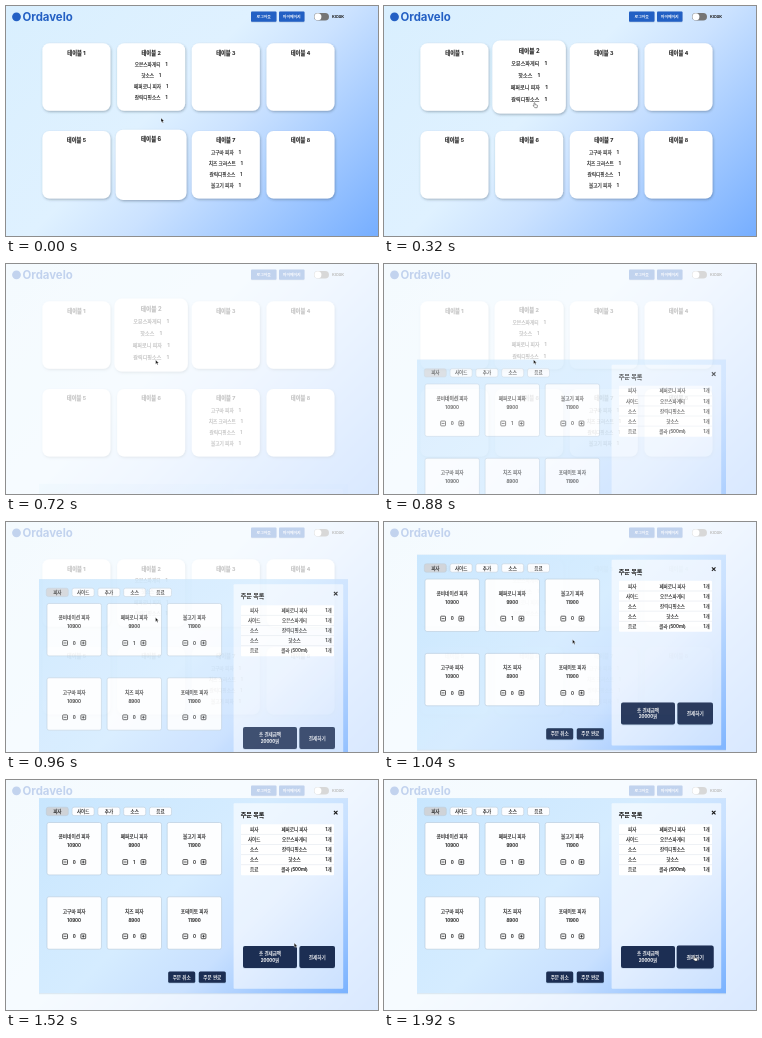
Recreate the animation shown at these times as an HTML page. Size 372 px wide and 230 px high, loop 2000 ms.

```html
<!DOCTYPE html>
<html lang="ko">
<head>
<meta charset="utf-8">
<style>
  html, body { margin: 0; width: 100%; height: 100%; overflow: hidden; }
  svg { display: block; width: 372px; height: 230px; }
  text { font-family: Inter, "Noto Sans CJK KR", "Noto Sans CJK", "Noto Sans CJK JP", sans-serif; }
</style>
</head>
<body>
<svg id="stage" viewBox="0 0 372 230">
  <defs>
    <linearGradient id="pageFill" gradientUnits="userSpaceOnUse" x1="35.5" y1="-35.5" x2="336.5" y2="265.5">
      <stop offset="0" stop-color="#d9effe"/>
      <stop offset=".42" stop-color="#dff1ff"/>
      <stop offset=".58" stop-color="#cbe2ff"/>
      <stop offset="1" stop-color="#76aeff"/>
    </linearGradient>
    <linearGradient id="modalFill" gradientUnits="userSpaceOnUse" x1="61.5" y1="-10.5" x2="313.5" y2="241.5">
      <stop offset="0" stop-color="#c8e6fe"/>
      <stop offset=".45" stop-color="#d5ecff"/>
      <stop offset=".67" stop-color="#c8e0ff"/>
      <stop offset="1" stop-color="#7ab2ff"/>
    </linearGradient>
    <filter id="shadow" x="-20%" y="-20%" width="140%" height="150%">
      <feDropShadow dx=".7" dy="1.2" stdDeviation="1.1" flood-color="#345" flood-opacity=".38"/>
    </filter>
    <filter id="softShadow" x="-20%" y="-20%" width="140%" height="150%">
      <feDropShadow dx="0" dy=".4" stdDeviation=".6" flood-color="#357" flood-opacity=".3"/>
    </filter>
  </defs>
</svg>
<script>
const LOOP = 2000, STEP = 80;
const INK = '#222', NAVY = '#1b2f52', BLUE = '#2460c4';
const stage = document.getElementById('stage');

function add(parent, tag, attrs = {}, content) {
  const node = document.createElementNS('http://www.w3.org/2000/svg', tag);
  for (const key in attrs) node.setAttribute(key, attrs[key]);
  if (content !== undefined) node.textContent = content;
  parent.append(node);
  return node;
}
const group = parent => add(parent, 'g');
const box = (parent, x, y, width, height, fill, rx = 0, extra = {}) =>
  add(parent, 'rect', { x, y, width, height, fill, rx, ...extra });
// The thin stroke gives a medium weight to the regular Hangul face.
const label = (parent, x, y, size, content, fill = INK, weight = 500) =>
  add(parent, 'text', { x, y: y + size * 0.36, 'font-size': size, 'font-weight': weight,
    fill, stroke: fill, 'stroke-width': 0.14, 'text-anchor': 'middle' }, content);
const line = (parent, d, stroke, width) =>
  add(parent, 'path', { d, stroke, 'stroke-width': width, fill: 'none' });

function button(parent, x, y, w, h, lines, size, fill, rx) {
  const g = group(parent);
  box(g, x, y, w, h, fill, rx, { filter: 'url(#softShadow)' });
  lines.forEach((s, i) =>
    label(g, x + w / 2, y + h / 2 + (i - (lines.length - 1) / 2) * 6.4, size, s, '#fff'));
  return g;
}

function buildHeader() {
  add(stage, 'circle', { cx: 10.5, cy: 10.8, r: 4.4, fill: BLUE });
  add(stage, 'text', { x: 16.5, y: 14.8, 'font-size': 11.4, 'font-weight': 700, fill: BLUE }, 'Ordavelo');
  button(stage, 245, 5.6, 25.5, 10.2, ['로그아웃'], 3.9, BLUE, 1);
  button(stage, 273, 5.6, 25.5, 10.2, ['마이페이지'], 3.9, BLUE, 1);
  box(stage, 308, 7, 15, 7.6, '#757575', 3.8);
  add(stage, 'circle', { cx: 311.9, cy: 10.8, r: 3.5, fill: '#fff' });
  label(stage, 332, 10.9, 4, 'KIOSK');
}

const orders = {
  2: ['오븐스파게티', '핫소스', '페퍼로니 피자', '갈릭디핑소스'],
  7: ['고구마 피자', '치즈 크러스트', '갈릭디핑소스', '불고기 피자']
};
function buildTable(number) {
  const i = number - 1;
  const x = 36.4 + (i % 4) * 74.7, y = i < 4 ? 37.2 : 125;
  const cx = x + 34, g = group(stage);
  box(g, x, y, 68, 67.6, '#fff', 7, { filter: 'url(#shadow)' });
  label(g, cx, y + 9.4, 5.3, '테이블 ' + number, INK, 600);
  (orders[number] || []).forEach((name, row) =>
    label(g, cx, y + 21 + row * 11.1, 4.7, name + '\u00a0\u00a0\u00a0 1'));
  return { g, cx, cy: y + 33.8 };
}

function buildMenuCard(parent, i, name, price, count) {
  const x = 41 + (i % 3) * 60.1, y = i < 3 ? 42.5 : 116.8, cx = x + 27.2, cy = y + 39.5;
  box(parent, x, y, 54.4, 52.4, '#fdfeff', 2, { stroke: '#b4c8da', 'stroke-width': 0.6 });
  label(parent, cx, y + 14.3, 4.7, name);
  label(parent, cx, y + 23.2, 4.6, price);
  label(parent, cx, cy, 4.6, count);
  for (const side of [-1, 1]) {
    const bx = cx + side * 9.1;
    box(parent, bx - 2.4, cy - 2.4, 4.8, 4.8, 'none', 0.6, { stroke: INK, 'stroke-width': 0.75 });
    line(parent, `M${bx - 1.4} ${cy}h2.8` + (side > 0 ? `M${bx} ${cy - 1.4}v2.8` : ''), INK, 0.75);
  }
}

function buildModal() {
  const g = group(stage);
  box(g, 33, 18.2, 309, 195, 'url(#modalFill)', 0, { filter: 'url(#softShadow)' });
  ['피자', '사이드', '추가', '소스', '음료'].forEach((name, i) => {
    const x = 40.3 + i * 25.8;
    box(g, x, 27.2, 22, 8.4, i ? '#fcfdff' : '#cfd3d8', 2, { stroke: '#b9c6d4', 'stroke-width': 0.5 });
    label(g, x + 11, 31.4, 4.5, name);
  });
  [['콤비네이션', 10900, 0], ['페퍼로니', 9900, 1], ['불고기', 11900, 0],
   ['고구마', 10900, 0], ['치즈', 8900, 0], ['포테이토', 11900, 0]]
    .forEach(([name, price, count], i) => buildMenuCard(g, i, name + ' 피자', price, count));
  button(g, 162.2, 191.6, 27, 11.2, ['주문 취소'], 4.6, NAVY, 1.5);
  button(g, 192.8, 191.6, 27, 11.2, ['주문 완료'], 4.6, NAVY, 1.5);

  box(g, 227.6, 23.2, 109.6, 185.6, '#fff', 1, { 'fill-opacity': 0.6 });
  label(g, 246.5, 35.2, 6, '주문 목록', INK, 600);
  line(g, 'M327.9 30.8l3.6 3.6m0-3.6l-3.6 3.6', '#111', 1.1);
  box(g, 235, 44.2, 93, 51, '#fff', 1);
  [['피자', '페퍼로니 피자'], ['사이드', '오븐스파게티'], ['소스', '갈릭디핑소스'],
   ['소스', '핫소스'], ['음료', '콜라 (500ml)']].forEach(([kind, name], i) => {
    const y = 49.4 + i * 10.1;
    label(g, 248.2, y, 4.5, kind);
    label(g, 288.5, y, 4.5, name);
    label(g, 322.6, y, 4.5, '1개');
    if (i < 4) line(g, `M235 ${y + 5}h93`, '#dde3ea', 0.5);
  });
  button(g, 237, 166, 54, 22, ['총 결제금액', '20000원'], 4.5, NAVY, 2);
  return { g, pay: button(g, 293.4, 166, 35.6, 22, ['결제하기'], 4.6, NAVY, 2) };
}

function buildCursors() {
  const style = { stroke: '#fff', 'stroke-width': 0.35, 'stroke-linejoin': 'round' };
  const arrow = add(stage, 'path', { d: 'M0 0v4.2l1-.9.7 1.6.8-.4-.7-1.5h1.3z', fill: '#111', ...style });
  const hand = add(stage, 'path', {
    d: 'M.6 0q.5 0 .5.5v1.4l2 .4q.6.2.5.9l-.4 1.8H.9L-.7 3.1q0-.6.8-.1V.5Q.1 0 .6 0z',
    fill: '#fff', stroke: '#222', 'stroke-width': 0.45 });
  return { arrow, hand };
}

box(stage, 0, 0, 372, 230, 'url(#pageFill)');
buildHeader();
const tables = [1, 2, 3, 4, 5, 6, 7, 8].map(buildTable);
const veil = box(stage, 0, 0, 372, 230, '#fff');
const modal = buildModal();
const cursors = buildCursors();

const progress = (t, from, to) => Math.min(1, Math.max(0, (t - from) / (to - from)));
const scaleAbout = (node, cx, cy, s) =>
  node.setAttribute('transform', `translate(${cx} ${cy}) scale(${s}) translate(${-cx} ${-cy})`);

// time, x, y
const path = [[0, 155, 112], [160, 150, 97], [960, 149.5, 95.5], [1040, 188.5, 117.5],
  [1200, 267.5, 148], [1280, 270, 152], [1420, 270, 152], [1640, 310, 176], [2000, 310, 176]];
function cursorAt(t) {
  const i = path.findIndex(p => p[0] > t);
  const [a, b] = [path[i - 1], path[i]];
  const k = progress(t, a[0], b[0]);
  return [a[1] + (b[1] - a[1]) * k, a[2] + (b[2] - a[2]) * k];
}

function render(t) {
  const second = tables[1], sixth = tables[5];
  const hover = progress(t, 80, 280) - progress(t, 720, 920);
  scaleAbout(second.g, second.cx, second.cy, 1 + 0.08 * hover);
  scaleAbout(sixth.g, sixth.cx, sixth.cy, 1 + 0.04 * (1 - progress(t, 0, 120)));
  veil.setAttribute('opacity', 0.72 * progress(t, 560, 720));

  const remaining = (1 - progress(t, 700, 1190)) ** 2.3;
  modal.g.setAttribute('transform', `translate(0 ${222 * remaining})`);
  modal.g.setAttribute('opacity', 1 - remaining);
  scaleAbout(modal.pay, 311.2, 177, 1 + 0.04 * progress(t, 1560, 1720));

  const pointing = (t >= 160 && t < 640) || t >= 1600;
  const [x, y] = cursorAt(t);
  for (const [name, node] of Object.entries(cursors)) {
    node.setAttribute('transform', `translate(${x} ${y})`);
    node.setAttribute('visibility', (name === 'hand') === pointing ? 'visible' : 'hidden');
  }
}

const start = performance.now();
function tick() {
  const t = (performance.now() - start) % LOOP;
  render(Math.floor(t / STEP) * STEP);
  requestAnimationFrame(tick);
}
tick();
</script>
</body>
</html>
```
